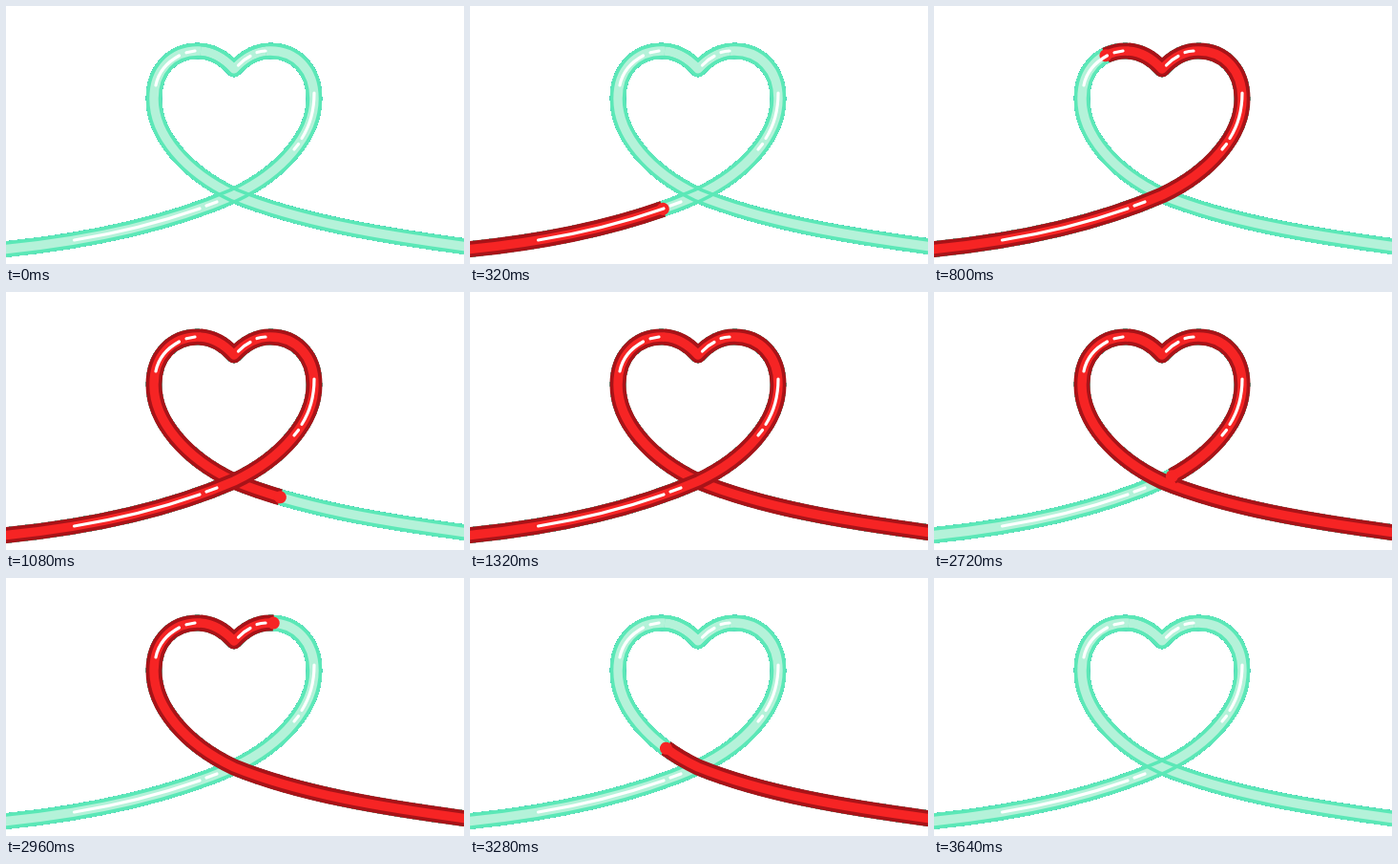
An HTML page that plays this animation: 480x270 px, repeating every 4.84 s.

```html
<!DOCTYPE html>
<html lang="en">
<head>
<meta charset="utf-8">
<title>Heart ribbon</title>
<style>
html, body { margin: 0; width: 100%; height: 100%; overflow: hidden; background: #fff; }
svg { display: block; width: 480px; height: 270px; }
path, use { fill: none; stroke-linejoin: round; }
.fringe { stroke: #35c9b0; stroke-width: 17.2; shape-rendering: crispEdges; }
.tube { stroke-width: 16.4; }
.core { stroke-width: 9.4; }
.red .tube { stroke: #a81318; stroke-width: 17; }
.red .core, .red .tip { stroke: #f62424; stroke-linecap: round; }
.tip { stroke-width: 13; }
.shine { stroke: #fff; stroke-width: 3.2; stroke-linecap: round; }
</style>
</head>
<body>
<svg viewBox="0 0 480 270">
  <defs>
    <path id="ribbon" d="M-12 255.7L0 254.5C85 246 170 228 239 198C290 174 323 135 323 97C323 67 304 47 277 47
      C262 47 250 54 239 66C228 54 216 47 201 47C174 47 155 67 155 97C155 135 188 174 239 198C308 226 394 240 480 251.5l12 1.6"/>
    <mask id="rim0" maskUnits="userSpaceOnUse" x="0" y="0" width="480" height="270">
      <use href="#ribbon" class="tube first" stroke="#fff"/><use href="#ribbon" class="core first" stroke="#000"/>
    </mask>
    <mask id="rim1" maskUnits="userSpaceOnUse" x="0" y="0" width="480" height="270">
      <use href="#ribbon" class="tube second" stroke="#fff"/><use href="#ribbon" class="core second" stroke="#000"/>
    </mask>
  </defs>
  <use href="#ribbon" class="fringe"/>
  <use href="#ribbon" class="tube" stroke="#b4f2d9"/>
  <rect width="480" height="270" fill="#5be8b7" mask="url(#rim0)"/>
  <rect width="480" height="270" fill="#5be8b7" mask="url(#rim1)"/>
  <g class="red" id="under">
    <use href="#ribbon" class="tube"/><use href="#ribbon" class="core"/><use href="#ribbon" class="tip"/>
  </g>
  <g class="red" id="over">
    <use href="#ribbon" class="tube"/><use href="#ribbon" class="core"/><use href="#ribbon" class="tip"/>
  </g>
  <path class="shine" d="M71.5 245Q140 234 203 212M210 209L221 205M302 150L306.5 144.5M310 138.5Q323 118 323 91
    M243.5 62Q249 56 256 52.5M263 48.5Q267 47.3 272 47M157 83Q161 63 181.5 52M189 48.8L198 47"/>
</svg>
<script>
const LOOP = 4840, STEP = 40, DRAIN_START = 2395, DRAIN_END = 3640;
const find = s => document.querySelector(s);
const total = find('#ribbon').getTotalLength();
const seam = total / 2 + 40; // just past the notch, on the left lobe
const fillKeys = [[80, 0], [320, 219], [800, 582], [1320, total]];

function showRange(el, from, to) {
  el.style.display = to > from ? '' : 'none';
  el.style.strokeDasharray = `${Math.max(0, to - from)} 9999`;
  el.style.strokeDashoffset = -from;
}

function headAt(t) {
  if (t <= fillKeys[0][0]) return 0;
  const i = fillKeys.findIndex(([time]) => t <= time);
  if (i < 0) return total;
  const [t0, s0] = fillKeys[i - 1], [t1, s1] = fillKeys[i];
  return s0 + (s1 - s0) * (t - t0) / (t1 - t0);
}

function tailAt(t) {
  const part = (t - DRAIN_START) / (DRAIN_END - DRAIN_START);
  return total * Math.min(1, Math.max(0, part));
}

function showStrand(id, from, to, tip, hasTip) {
  const [tubeEl, coreEl, tipEl] = find(id).children;
  showRange(tubeEl, from, to);
  showRange(coreEl, from, to);
  showRange(tipEl, tip, hasTip ? tip + 0.1 : tip);
}

function draw(now) {
  const t = Math.floor((now - start) % LOOP / STEP) * STEP;
  const head = headAt(t), tail = tailAt(t);
  const tip = tail > 0 ? tail : head;
  showStrand('#under', Math.max(tail, seam - 4), head, tip, tip > seam);
  showStrand('#over', tail, Math.min(head, seam), tip, tip <= seam);
  requestAnimationFrame(draw);
}

// The crossing shows the rims of both strands; they overlap around the notch.
document.querySelectorAll('.first').forEach(el => showRange(el, 0, seam));
document.querySelectorAll('.second').forEach(el => showRange(el, total / 2 - 40, total));

const start = performance.now();
draw(start);
</script>
</body>
</html>
```
